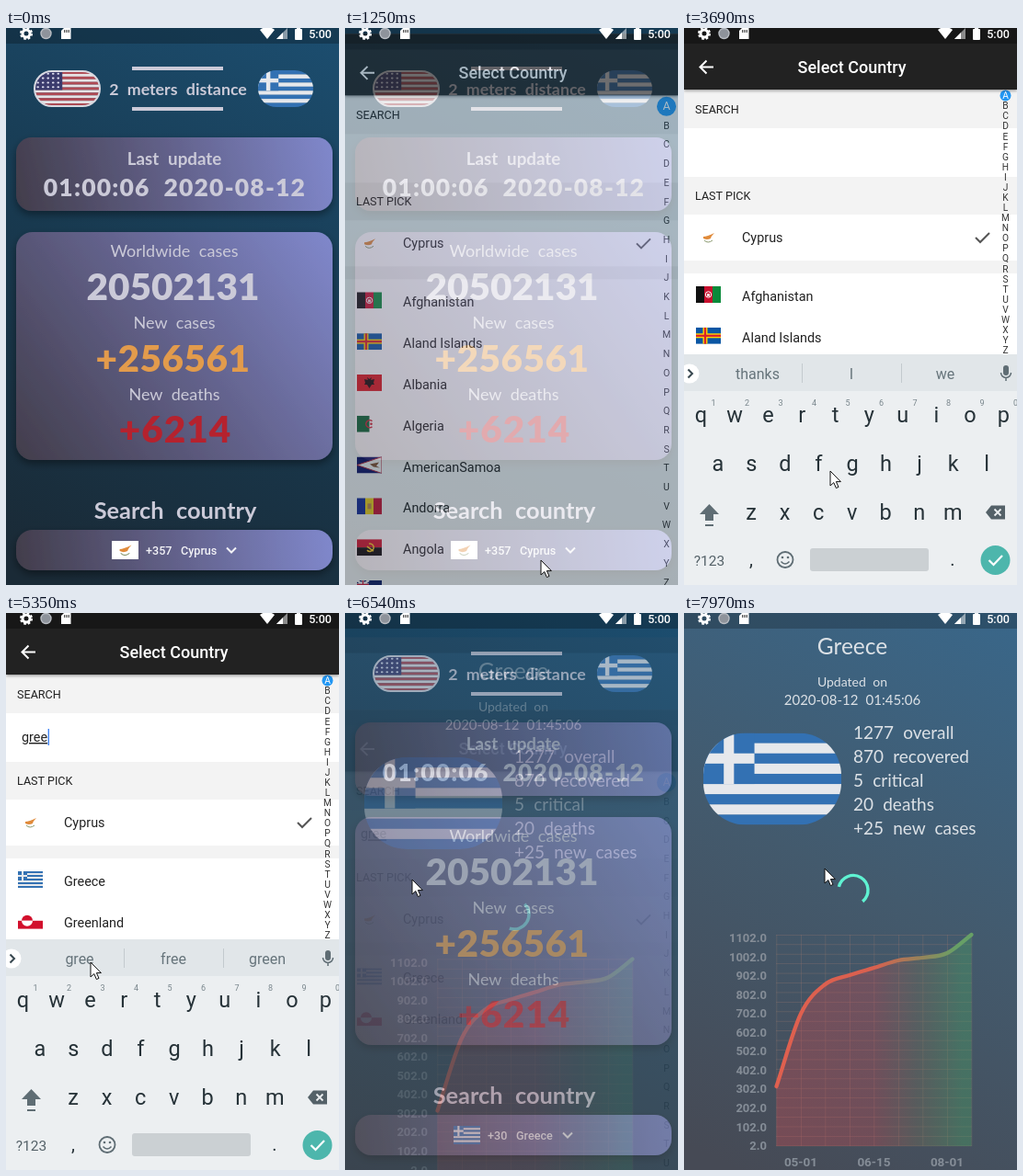
An HTML page that plays this animation: 362x606 px, repeating every 8000 ms.

```html
<!DOCTYPE html>
<html lang="en">
<head>
<meta charset="utf-8">
<title>Country statistics</title>
<style>
html, body { margin: 0; width: 100%; height: 100%; overflow: hidden; background: #16384f; }
svg { display: block; }
#stage { width: 362px; height: 606px; }
text { font-family: Roboto, "Noto Sans", sans-serif; white-space: pre; }
.deco { font-family: Lato, "Open Sans", sans-serif; word-spacing: .28em; }
</style>
</head>
<body>
<svg id="stage" viewBox="0 0 362 606"></svg>
<script>
const LOOP = 8000;
const stage = document.getElementById('stage');

// ---------- drawing helpers ----------
const text = (x, y, s, size, fill, extra = '') =>
  `<text x="${x}" y="${y}" font-size="${size}" fill="${fill}" ${extra}>${s}</text>`;
const mid = 'text-anchor="middle"', end = 'text-anchor="end"';
const deco = (x, y, s, size, fill, extra = mid) =>
  text(x, y, s, size, fill, `class="deco" ${extra}`);
const bold = mid + ' font-weight="700"', heavy = mid + ' font-weight="900"';
const rect = (x, y, w, h, fill, extra = '') =>
  `<rect x="${x}" y="${y}" width="${w}" height="${h}" fill="${fill}" ${extra}/>`;
const circle = (x, y, r, fill, extra = '') =>
  `<circle cx="${x}" cy="${y}" r="${r}" fill="${fill}" ${extra}/>`;
const path = (d, fill, extra = '') => `<path d="${d}" fill="${fill}" ${extra}/>`;
const line = (d, color, w = 2, extra = '') =>
  path(d, 'none', `stroke="${color}" stroke-width="${w}" ${extra}`);
const times = (n, f) => Array.from({ length: n }, (_, i) => f(i)).join('');
const gradient = (id, x1, y1, x2, y2, stops) =>
  `<linearGradient id="${id}" gradientUnits="userSpaceOnUse" x1="${x1}" y1="${y1}" x2="${x2}" y2="${y2}">` +
  stops.map(([at, c, o = 1]) => `<stop offset="${at}" stop-color="${c}" stop-opacity="${o}"/>`).join('') +
  '</linearGradient>';

// ---------- flags, each on a 27 x 18 field ----------
const bars = colors => colors.map((c, i) => rect(i * 9, 0, 9, 18, c)).join('');
const cross = (x, w, color) => rect(x - w / 2, 0, w, 18, color) + rect(0, 9 - w / 2, 27, w, color);
const flags = {
  Cyprus: () => rect(0, 0, 27, 18, '#fff') +
    path('M8 8Q12 8 20 4Q16 8 16 10Q12 12 8 10Z', '#e08a3a') + line('M9 12Q13 16 18 12', '#8a9a70', 1),
  Afghanistan: () => bars(['#111', '#c8102e', '#0a8a3a']) +
    circle(13.5, 9, 3.2, 'none', 'stroke="#fff" stroke-width="1"') + rect(12, 8, 3, 3, '#f4dada'),
  'Aland Islands': () => rect(0, 0, 27, 18, '#0b56a4') + cross(10, 5, '#ffd200') + cross(10, 2.2, '#d8202c'),
  Albania: () => rect(0, 0, 27, 18, '#e0161e') +
    path('M13.5 5L11 3L12 6L8 5L9 9L8 11L11 11L13.5 15L16 11L19 11L18 9L19 5L15 6L16 3Z', '#1c0a0a'),
  Algeria: () => rect(0, 0, 27, 18, '#fff') + rect(0, 0, 13.5, 18, '#0b6836') +
    line('M16.5 6A4 4 0 1 0 16.5 12', '#d22335', 1.5) + circle(15.5, 9, 1.3, '#d22335'),
  AmericanSamoa: () => rect(0, 0, 27, 18, '#14186e') +
    path('M0 9L27 0V18Z', '#fff', 'stroke="#b5243c" stroke-width="1"') +
    path('M14 8L24 6L21 10L25 12L18 11Z', '#8c5a3a'),
  Andorra: () => bars(['#1a2fa0', '#f8d820', '#d01838']) + rect(11.5, 6, 4, 6, '#c89050'),
  Angola: () => rect(0, 0, 27, 9, '#d0142c') + rect(0, 9, 27, 9, '#0a0a0a') +
    line('M13 5A4.2 4.2 0 1 1 11 12M11 8L18 13', '#f5cc20', 1.5),
  Anguilla: () => rect(0, 0, 27, 18, '#10206c') +
    line('M0 0L13 9M13 0L0 9M6.5 0V9M0 4.5H13', '#fff', 2.4) +
    line('M6.5 0V9M0 4.5H13', '#d01838', 1.2) + path('M18 6H24V10L21 14L18 10Z', '#e8e4d0'),
  Greece: () => times(9, i => rect(0, i * 2, 27, 2.05, i % 2 ? '#e6e8ec' : '#3371b3')) +
    rect(0, 0, 10, 10, '#3371b3') + rect(4, 0, 2, 10, '#e6e8ec') + rect(0, 4, 10, 2, '#e6e8ec'),
  Greenland: () => rect(0, 0, 27, 9, '#fff') + rect(0, 9, 27, 9, '#d2102c') +
    path('M4 9A6 6 0 0 1 16 9Z', '#d2102c') + path('M4 9A6 6 0 0 0 16 9Z', '#fff'),
  USA: () => times(13, i => rect(0, i * 18 / 13, 27, 1.42, i % 2 ? '#e6e2e4' : '#b04a54')) +
    rect(0, 0, 11.5, 9.7, '#3b3b6d') +
    times(20, i => circle(1.4 + i % 5 * 2.1, 1.3 + (i / 5 | 0) * 2.3, .5, '#dde'))
};
const flag = (name, x, y, w = 27, h = 18) =>
  `<svg x="${x}" y="${y}" width="${w}" height="${h}" viewBox="0 0 27 18" preserveAspectRatio="none">${flags[name]()}</svg>`;
const pill = (id, name, x, y, w, h, r) =>
  `<clipPath id="${id}"><rect x="${x}" y="${y}" width="${w}" height="${h}" rx="${r}"/></clipPath>` +
  `<g clip-path="url(#${id})">${flag(name, x, y, w, h)}</g>`;

// ---------- home page ----------
const card = (id, y, h, r) =>
  gradient(id, 11, y + h, 355, y, [[0, '#423d4b'], [.5, '#62618a'], [1, '#8088cc']]) +
  rect(11, y, 344, h, `url(#${id})`, `rx="${r}" filter="url(#shadow)"`);
const pale = '#cbcad8';
const pickedCountry = country => {
  const greek = country === 'Greece';
  return flag(country, greek ? 118 : 115, 558, 29, 20) +
    text(greek ? 155 : 152, 573, greek ? '+30' : '+357', 12.6, '#f2f2f6', 'font-weight="500"') +
    text(greek ? 186 : 190, 573, country, 12.6, '#f2f2f6', 'font-weight="500"') +
    line(`M${greek ? 237 : 240} 565.5l5 5l5 -5`, '#f2f2f6');
};
const home = `
  ${gradient('homeBg', 362, 0, 60, 606, [[0, '#1c4e70'], [.5, '#18394f'], [1, '#1a2a36']])}
  ${rect(0, 0, 362, 606, 'url(#homeBg)')}${rect(0, 0, 362, 17, '#000', 'opacity=".25"')}
  ${pill('usPill', 'USA', 31, 47, 71, 38, 19)}
  ${rect(31, 47, 71, 38, 'none', 'rx="19" stroke="#d8d8e0" stroke-width="2"')}
  ${pill('grPill', 'Greece', 274, 46, 60, 40, 20)}
  ${rect(137, 42, 99, 4, pale)}${rect(137, 86, 99, 4, pale)}
  ${deco(187, 73, '2 meters distance', 17.8, pale, bold)}
  ${card('card1', 119, 80, 17)}${card('card2', 222, 248, 18)}${card('card3', 546, 44, 18)}
  ${deco(183, 148.5, 'Last update', 18.8, pale, bold)}
  ${deco(183.5, 182.5, '01:00:06 2020-08-12', 26.5, pale, heavy + ' letter-spacing="1.2"')}
  ${deco(183, 249, 'Worldwide cases', 18, pale)}
  ${deco(181.5, 295.5, '20502131', 40.5, pale, heavy)}
  ${deco(183, 327, 'New cases', 18, pale)}
  ${deco(181.5, 373.5, '+256561', 40.5, '#e29b4c', heavy + ' letter-spacing=".5"')}
  ${deco(183, 405, 'New deaths', 18, pale)}
  ${deco(184, 450.5, '+6214', 40.5, '#b5222e', heavy + ' letter-spacing="1"')}
  ${deco(184, 534, 'Search country', 25.4, pale, bold)}
  <g id="picked"></g>`;

// ---------- country picker ----------
const ink = '#222';
const row = (name, i) => {
  const y = 292 + i * 44.8;
  return flag(name, 13, y - 11) + text(63, y + 5, name, 14.4, ink);
};
const results = {
  '': ['Afghanistan', 'Aland Islands', 'Albania', 'Algeria', 'AmericanSamoa', 'Andorra', 'Angola', 'Anguilla'],
  g: ['Afghanistan', 'Algeria'],
  gr: ['Greece', 'Greenland'], gre: ['Greece', 'Greenland'], gree: ['Greece', 'Greenland']
};
const suggestions = {
  '': ['thanks', 'I', 'we'], g: ['g', 'good', 'go'], gr: ['gr', 'great', 'group'],
  gre: ['gre', 'great', 'green'], gree: ['gree', 'free', 'green']
};
const picker = `
  ${rect(0, 0, 362, 606, '#fff')}
  ${rect(0, 67, 362, 42, '#f3f3f3')}${text(12, 92.5, 'SEARCH', 12.6, ink)}
  ${rect(0, 162, 362, 41, '#f3f3f3')}${text(12, 187, 'LAST PICK', 12.6, ink)}
  ${flag('Cyprus', 13, 219)}${text(63, 233, 'Cyprus', 14.4, ink)}
  ${line('M317 228l5 5l10 -10', '#555')}
  ${rect(0, 253, 362, 14, '#f3f3f3')}
  <g id="query"></g><g id="rows"></g><g id="letters"></g>
  ${rect(0, 0, 362, 67, '#212121', 'filter="url(#barShadow)"')}${rect(0, 0, 362, 17, '#171717')}
  ${line('M32 42.5H18M24.5 35.5l-7 7l7 7', '#fff')}
  ${text(182.5, 49, 'Select Country', 18, '#fff', mid + ' font-weight="500"')}`;

const letterIndex = k => {
  const first = 79 - 5.5 * k, step = 20.7 - 9.62 * k, size = 10.5 - .3 * k;
  return circle(349.5, first, 10.5 - 4.5 * k, '#2196f3') +
    times(26, i => text(349.5, first + i * step + 3.7, String.fromCharCode(65 + i),
      i || k > .5 ? size : 12.5, i ? '#333' : '#fff', mid));
};

// ---------- keyboard ----------
const keyRow = (keys, x0, y) => [...keys].map((c, i) => text(x0 + i * 36.55, y, c, 23.5, '#263238', mid)).join('');
const keyboard = `
  ${rect(0, 355, 362, 251, '#eceff1')}${rect(0, 355, 362, 40, '#e1e6e9')}
  ${circle(6, 376, 10.5, '#fff')}${line('M4.5 371.5l4.5 4.5l-4.5 4.5', '#37474f')}
  ${rect(128, 365, 1, 21, '#c3cace')}${rect(236, 365, 1, 21, '#c3cace')}<g id="suggest"></g>
  ${rect(347, 367, 6, 11, '#5f6d74', 'rx="3"')}${line('M344.5 375a5.5 5.5 0 0 0 11 0M350 380.5V384', '#5f6d74', 1.5)}
  ${keyRow('qwertyuiop', 18.5, 429)}${keyRow('asdfghjkl', 36.8, 482)}${keyRow('zxcvbnm', 73, 535)}
  ${times(10, i => text(32 + i * 36.5, 411, (i + 1) % 10, 9, '#78858b', mid))}
  ${path('M27.5 518l10.5 11h-6v7h-9v-7h-6z', '#5f6d74')}${rect(23, 540, 9, 2, '#5f6d74')}
  ${path('M328 527l6 -7.5h15v15h-15z', '#546168')}${line('M337.5 523.5l7 7m0 -7l-7 7', '#eceff1', 1.8)}
  ${text(27.5, 584.5, '?123', 15.5, '#546168', mid)}${text(73, 585, ',', 20, '#263238', mid)}
  ${circle(110, 578.5, 8.5, 'none', 'stroke="#5f6d74" stroke-width="1.8"')}
  ${circle(107, 576, 1.3, '#5f6d74')}${circle(113, 576, 1.3, '#5f6d74')}${line('M105.5 580.5q4.5 5 9 0', '#5f6d74', 1.6)}
  ${rect(137, 566, 129, 25, '#cbd0d3', 'rx="3"')}${text(292, 585, '.', 20, '#263238', mid)}
  ${circle(338.5, 579, 16, '#4db6ac')}${line('M331.5 579l5 5l9.5 -10', '#fff', 2.2)}`;

// ---------- statistics page ----------
const curveY = [515, 436, 404, 394, 386, 378, 375, 370, 350];
const colX = i => 100.5 + i * 26.5;
const slope = i => {
  const a = Math.max(i - 1, 0), b = Math.min(i + 1, curveY.length - 1);
  return (curveY[b] - curveY[a]) / (b - a) / 3;
};
const curve = curveY.slice(1).reduce((d, y, i) => d +
  `C${colX(i) + 8.8} ${curveY[i] + slope(i)} ${colX(i + 1) - 8.8} ${y - slope(i + 1)} ${colX(i + 1)} ${y}`,
  `M${colX(0)} ${curveY[0]}`);
const chartStops = o => [[0, '#e0604f', o], [.5, '#d9604f', o], [.72, '#9c8159', o], [.92, '#67a066', o], [1, '#67a066', o]];
const soft = '#dce1e6', label = '#858d97';
const stats = `
  ${gradient('statsBg', 362, 0, 60, 606, [[0, '#39678a'], [.5, '#435a6d'], [1, '#464a55']])}
  ${gradient('stroke', 100, 0, 313, 0, chartStops(1))}
  ${gradient('area', 100, 0, 313, 0, [[0, '#d24a50', .34], [.5, '#d24a50', .3], [.72, '#7a7058', .34], [.95, '#4a9d62', .4], [1, '#4a9d62', .4]])}
  ${rect(0, 0, 362, 606, 'url(#statsBg)')}${rect(0, 0, 362, 17, '#000', 'opacity=".22"')}
  ${deco(183, 45, 'Greece', 24.5, soft)}
  ${deco(183, 80, 'Updated on', 14, soft)}${deco(183, 100, '2020-08-12 01:45:06', 15, soft)}
  ${pill('bigPill', 'Greece', 21, 130.5, 150, 100, 46)}
  ${['1277 overall', '870 recovered', '5 critical', '20 deaths', '+25 new cases']
    .map((s, i) => deco(184, 136.5 + i * 26, s, 19, soft, '')).join('')}
  <path id="spinner" fill="none" stroke="#5ff2d2" stroke-width="3.4"/>
  ${times(23, i => rect(100, 350 + i * 10.43, 213, .7, '#96786f', 'opacity=".42"'))}
  ${times(9, i => rect(colX(i), 350, .7, 230, '#96786f', 'opacity=".42"'))}
  ${path(curve + 'V580H100.5Z', 'url(#area)')}
  ${line(curve, 'url(#stroke)', 4.2, 'stroke-linecap="round"')}
  ${times(12, i => text(90, 358 + i * 20.55, 1102 - i * 100 + '.0', 13, label, end + ' font-weight="700"'))}
  ${['05-01', '06-15', '08-01'].map((s, i) => text(127 + i * 79.5, 602, s, 13.5, label, bold)).join('')}`;

// ---------- status bar and pointer ----------
const statusBar = `
  ${circle(22, 6, 4, 'none', 'stroke="#fff" stroke-width="3"')}
  ${circle(22, 6, 6, 'none', 'stroke="#fff" stroke-width="2" stroke-dasharray="2.6 2.11"')}
  ${circle(43.5, 6, 5.5, '#8e939b')}${circle(43.5, 6, 5.5, 'none', 'stroke="#b9bdc3" stroke-width="1.4"')}
  ${path('M63 0H70.5V12H60V3Z', '#fff')}${rect(63, 2, 1.3, 3, '#555')}${rect(65.3, 2, 1.3, 3, '#555')}${rect(67.6, 2, 1.3, 3, '#555')}
  ${path('M276 2Q284 -4 292 2L284 12Z', '#fff')}${path('M306 0V12H294Z', '#fff', 'opacity=".5"')}${path('M301 5V12H294Z', '#fff')}
  ${rect(314, 1, 8, 12, '#fff', 'rx="1"')}${rect(316, -1, 4, 3, '#fff')}
  ${text(354, 11, '5:00', 12.6, '#fff', end + ' font-weight="500"')}`;
const pointer = path('M0 0V16L3.8 12.6L6.4 18.6L9 17.4L6.4 11.6H11.4Z', '#fff', 'stroke="#111" stroke-width="1"');

stage.innerHTML = `
  <defs>
    <filter id="shadow" x="-10%" y="-20%" width="120%" height="150%"><feDropShadow dx="0" dy="4" stdDeviation="4" flood-opacity=".4"/></filter>
    <filter id="barShadow" x="-5%" width="110%" height="130%"><feDropShadow dx="0" dy="1.5" stdDeviation="1.5" flood-opacity=".35"/></filter>
  </defs>
  <g id="home">${home}</g><g id="picker">${picker}</g><g id="keyboard">${keyboard}</g>
  <g id="stats">${stats}</g>${statusBar}<g id="pointer">${pointer}</g>`;

// ---------- motion ----------
const clamp = v => Math.max(0, Math.min(1, v));
const bezier = (x1, y1, x2, y2) => x => {
  const at = (u, a, b) => 3 * u * (1 - u) ** 2 * a + 3 * u * u * (1 - u) * b + u ** 3;
  let lo = 0, hi = 1;
  for (let i = 0; i < 20; i++) {
    const u = (lo + hi) / 2;
    if (at(u, x1, x2) < x) lo = u; else hi = u;
  }
  return at(lo, y1, y2);
};
const fastOutSlowIn = bezier(.4, 0, .2, 1), easeIn = bezier(.42, 0, 1, 1);
const progress = (t, start, length) => clamp((t - start) / length);

const pointerPath = [
  [420, 221, 606], [650, 213, 579], [1300, 213, 579], [1620, 128, 130], [1850, 106, 88], [2050, 86, 102],
  [2230, 97, 126], [2380, 96, 153], [2480, 96, 153], [2680, 57, 131], [3150, 57, 131], [3690, 159, 482],
  [3810, 172, 478], [4150, 172, 478], [4450, 129, 426], [4600, 129, 426], [4740, 93, 426], [5120, 93, 426],
  [5350, 92, 380], [5540, 73, 282], [5770, 73, 290], [6750, 73, 290], [7400, 153, 278]
];
const pointerAt = t => {
  const i = pointerPath.findIndex(p => p[0] > t);
  if (i === 0) return [221, 620];
  if (i < 0) return pointerPath.at(-1).slice(1);
  const [t0, x0, y0] = pointerPath[i - 1], [t1, x1, y1] = pointerPath[i];
  const u = (t - t0) / (t1 - t0), k = u * u * (3 - 2 * u);
  return [x0 + (x1 - x0) * k, y0 + (y1 - y0) * k];
};

const typed = [[5050, 'gree'], [4790, 'gre'], [4540, 'gr'], [3930, 'g'], [0, '']];
const $ = id => document.getElementById(id);
const cache = {};
const fill = (id, key, make) => {
  if (cache[id] !== key) { cache[id] = key; $(id).innerHTML = make(); }
};
const showPage = (id, p) => {
  const el = $(id);
  el.style.display = p > 0 ? '' : 'none';
  el.setAttribute('opacity', easeIn(p));
  el.setAttribute('transform', `translate(0 ${(1 - fastOutSlowIn(p)) * 151.5})`);
};

const spin = t => {
  const wrap = v => v - Math.floor(v);
  const phase = wrap(.262 + (t - 7970) / 1333), turn = wrap(.72 + (t - 7970) / 2222);
  const head = fastOutSlowIn(clamp(phase * 2)), tail = fastOutSlowIn(clamp(phase * 2 - 1));
  const a = Math.PI * (-.5 + tail * 1.5 + turn * 2 + phase * .5);
  const sweep = Math.max((head - tail) * 1.5 * Math.PI, .02), r = 16;
  const at = v => `${184 + r * Math.cos(v)} ${301.5 + r * Math.sin(v)}`;
  $('spinner').setAttribute('d', `M${at(a)}A${r} ${r} 0 ${+(sweep > Math.PI)} 1 ${at(a + sweep)}`);
};

function render(t) {
  const query = typed.find(([at]) => t >= at)[1];
  const country = t < 6320 ? 'Cyprus' : 'Greece';
  fill('picked', country, () => pickedCountry(country));

  showPage('picker', t < 6000 ? progress(t, 1027, 300) : 1 - progress(t, 6324, 300));
  fill('rows', query, () => results[query].map(row).join(''));
  fill('suggest', query, () => suggestions[query].map((s, i) => text(80 + i * 102, 381.5, s, 16, '#66747b', mid)).join(''));

  const up = fastOutSlowIn(progress(t, 3080, 260)) - fastOutSlowIn(progress(t, 5990, 240));
  $('keyboard').style.display = up > 0 ? '' : 'none';
  $('keyboard').setAttribute('transform', `translate(0 ${(1 - up) * 251})`);
  const squeeze = t >= 3300 && t < 6150 ? 1 : 0;
  fill('letters', squeeze, () => letterIndex(squeeze));

  const lastKey = typed.find(([at]) => t >= at)[0] || 2840;
  const caret = t >= 2840 && t < 6000 && (t - lastKey) % 1000 < 500;
  fill('query', query + caret, () => {
    const width = [0, 8.2, 13.2, 20.9, 28.6][query.length];
    return text(17, 140, query, 14.4, ink, 'text-decoration="underline"') +
      (caret ? rect(17 + width, 126, 1.4, 18, '#4285f4') : '');
  });

  showPage('stats', progress(t, 6378, 300));
  spin(t);
  $('pointer').setAttribute('transform', `translate(${pointerAt(t)})`);
}

const begin = performance.now();
function tick() {
  render((performance.now() - begin) % LOOP);
  requestAnimationFrame(tick);
}
tick();
</script>
</body>
</html>
```
